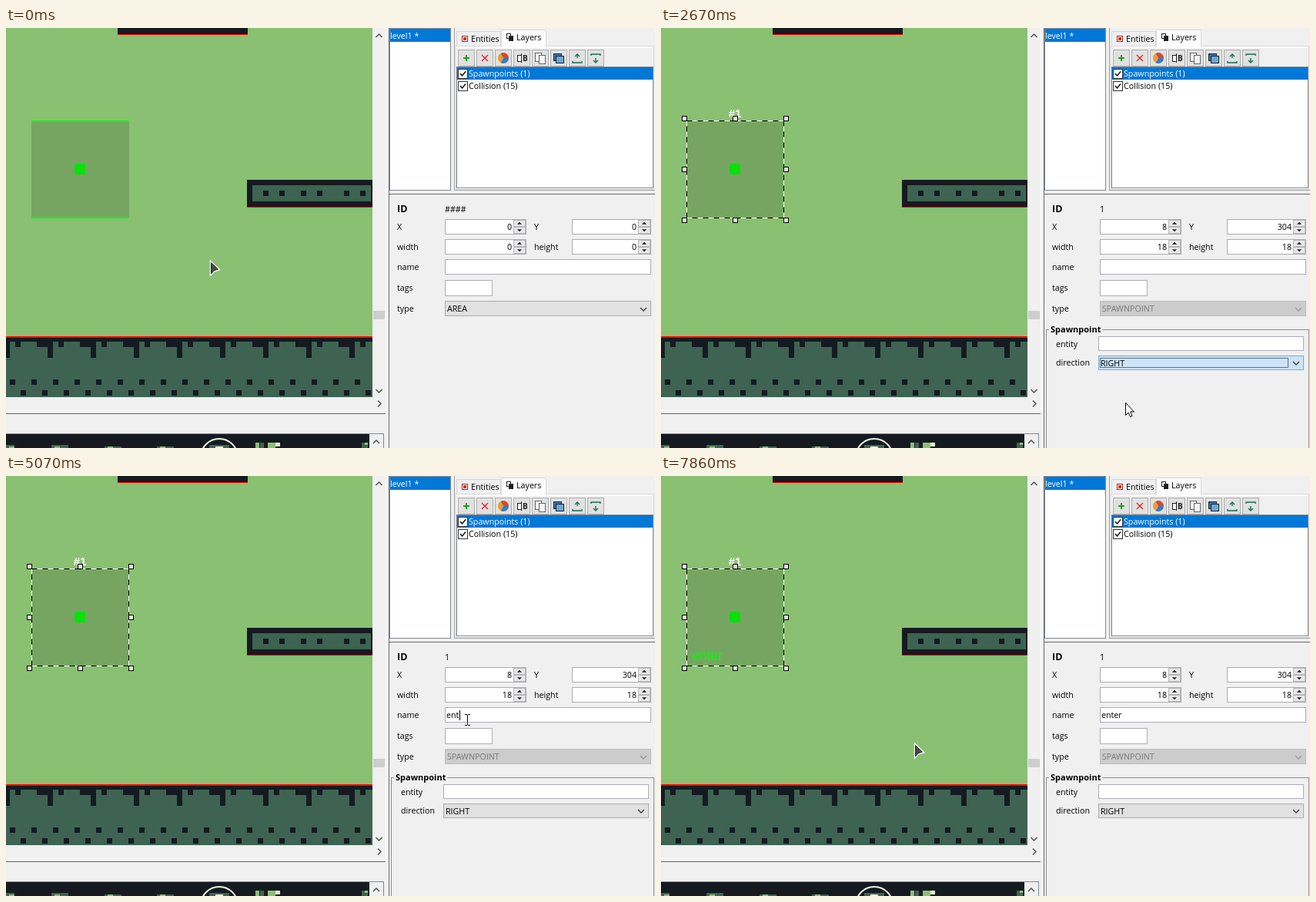
An HTML page with a canvas for the animation above (8 s loop, 843 px wide and 545 px high).

```html
<!DOCTYPE html>
<html>
<head>
<meta charset="utf-8">
<style>
html, body { margin: 0; width: 100%; height: 100%; overflow: hidden; background: #f0f0f0; }
canvas { display: block; }
</style>
</head>
<body>
<canvas id="stage" width="843" height="545"></canvas>
<script>
const ctx = document.getElementById('stage').getContext('2d');
const LOOP = 8000;
const UI = '10.7px "Open Sans", sans-serif';
const BOLD = 'bold 11px "Open Sans", sans-serif';
const BLUE = '#0078d7', INK = '#151a20', TEAL = '#3e6352', GRASS = '#8ac072';

// Event times in ms
const SELECT = 550, OPEN = 1640, CLOSE = 2650, FOCUS = 3900, NAMED = 7560;
const CLICKS = [500, 1590, 2560, 3900];
const KEYS = [4600, 4900, 5070, 5140, 5220];
const DIRECTIONS = ['DOWN', 'LEFT', 'RIGHT', 'UNDEFINED', 'UP'];
// Pointer path: time, x, y
const PATH = [
  [0, 266, 303], [130, 266, 303], [480, 122, 204], [850, 122, 204], [1150, 522, 357],
  [1460, 610, 435], [1720, 610, 435], [2040, 609, 471], [2190, 603, 486], [2780, 603, 486],
  [3610, 595, 322], [3670, 595, 322], [3760, 599, 316], [6230, 599, 316], [6840, 330, 348],
  [LOOP, 330, 348]
];

function rect(color, x, y, w, h) {
  ctx.fillStyle = color;
  ctx.fillRect(x, y, w, h);
}
function box(x, y, w, h, fill = '#fff', edge = '#abadb3') {
  rect(edge, x, y, w, h);
  rect(fill, x + 1, y + 1, w - 2, h - 2);
}
function text(str, x, y, color = '#000', font = UI, align = 'left') {
  ctx.font = font;
  ctx.textAlign = align;
  ctx.fillStyle = color;
  ctx.fillText(str, x, y);
}
function line(points, color, width = 1, fill) {
  ctx.beginPath();
  points.forEach(([x, y]) => ctx.lineTo(x, y));
  if (fill) {
    ctx.closePath();
    ctx.fillStyle = fill;
    ctx.fill();
  }
  ctx.lineWidth = width;
  ctx.strokeStyle = color;
  ctx.stroke();
}
function chevron(x, y, dx, dy, color = '#505050') {
  line([[x - dx - 4 * !!dy, y - dy - 4 * !!dx], [x + dx, y + dy], [x - dx + 4 * !!dy, y - dy + 4 * !!dx]], color, 1.5);
}
function disc(x, y, r, color, from = 0, to = 2 * Math.PI) {
  ctx.beginPath();
  ctx.moveTo(x, y);
  ctx.arc(x, y, r, from, to);
  ctx.fillStyle = color;
  ctx.fill();
}

function pointerAt(t) {
  const i = Math.max(1, PATH.findIndex(p => p[0] > t));
  const [t0, x0, y0] = PATH[i - 1], [t1, x1, y1] = PATH[i];
  const k = (t - t0) / (t1 - t0), e = k * k * (3 - 2 * k);
  return { x: Math.round(x0 + (x1 - x0) * e), y: Math.round(y0 + (y1 - y0) * e) };
}
const inside = (p, x, y, w, h) => p.x >= x && p.x < x + w && p.y >= y && p.y < y + h;

function drawLevel() {
  rect(GRASS, 0, 0, 476, 479);
  rect(INK, 145, 0, 169, 8);
  rect('#f00', 145, 8, 169, 1);

  rect(INK, 313, 197, 163, 35);
  rect('#f00', 313, 232, 163, 1);
  rect(TEAL, 320, 204, 154, 21);
  for (const x of [334, 355, 383, 404, 439, 460]) rect(INK, x, 211, 7, 7);

  rect(TEAL, 0, 400, 476, 79);
  rect(INK, 0, 400, 476, 7);
  rect('#f00', 0, 400, 476, 2);
  for (let x = -2; x < 476; x += 56) {
    rect(INK, x, 407, 7, 21);
    rect(INK, x + 14, 407, 7, 7);
    rect(INK, x + 42, 407, 14, 7);
  }
  for (let x = 5; x < 476; x += 28) {
    rect(INK, x, 456, 7, 7);
    rect(INK, x + 14, 470, 7, 7);
  }
}

function drawSpawn(t) {
  rect('#76a562', 33, 120, 127, 127);
  rect('#08e008', 89, 176, 14, 14);
  if (t < SELECT) {
    rect('#0f0', 33, 120, 127, 2);
    rect('#0f0', 33, 245, 127, 2);
    return;
  }
  if (t >= NAMED) text('enter', 40, 239, '#0f0', '17.5px "Liberation Sans", Arial, sans-serif');
  text('#1', 96, 116, '#fff', 'bold 15px "Liberation Sans", Arial, sans-serif', 'center');
  ctx.lineWidth = 1;
  ctx.strokeStyle = '#fff';
  ctx.strokeRect(33.5, 120.5, 126, 126);
  ctx.strokeStyle = '#000';
  ctx.setLineDash([7, 7]);
  ctx.lineDashOffset = 7 * Math.floor((t - 4100) / 242);
  ctx.strokeRect(33.5, 120.5, 126, 126);
  ctx.setLineDash([]);
  for (const x of [27, 93, 159])
    for (const y of [114, 180, 246])
      if (x !== 93 || y !== 180) box(x, y, 7, 7, '#e4eee0', '#000');
}

function drawFrame() {
  rect('#f0f0f0', 476, 0, 367, 545);
  rect('#f0f0f0', 0, 479, 498, 66);
  rect('#cdcdcd', 477, 367, 15, 11);
  chevron(484.5, 10, 0, -2);
  chevron(484.5, 471, 0, 2);
  chevron(485, 487.5, 2, 0);
  rect('#fff', 493, 0, 1, 496);
  rect('#fff', 0, 496, 494, 1);
  rect('#696969', 0, 500, 493, 1);
  rect('#696969', 497, 0, 1, 545);
  rect('#696969', 498, 215, 345, 1);

  // Tile sheet
  rect('#828790', 0, 526, 491, 19);
  rect(INK, 0, 527, 472, 18);
  rect('#f0f0f0', 472, 527, 18, 18);
  chevron(481, 537, 0, -2);
  for (const x of [0, 59, 128, 196]) {
    rect(TEAL, x, x > 99 ? 543 : 541, x ? 22 : 11, 4);
    rect(GRASS, x + 4, 543, 7, 2);
  }
  rect(GRASS, 324, 538, 5, 7);
  rect(TEAL, 330, 538, 5, 7);
  rect(GRASS, 340, 538, 10, 7);
  rect('#e4f5c8', 350, 538, 6, 5);
  rect(TEAL, 462, 538, 8, 7);
  rect(GRASS, 466, 538, 4, 3);
  ctx.strokeStyle = '#e8f2e0';
  ctx.lineWidth = 2;
  ctx.beginPath();
  ctx.arc(277, 557, 24, 0, 7);
  ctx.stroke();
  rect(TEAL, 264, 541, 26, 4);
  rect('#e8f2e0', 272, 543, 10, 2);
}

function drawIcons() {
  for (let i = 0; i < 8; i++) box(587 + 24 * i, 28, 22, 22, '#e1e1e1', '#adadad');
  rect('#20a020', 594, 38, 8, 2);
  rect('#20a020', 597, 35, 2, 8);
  line([[618, 35], [626, 43]], '#e02020', 1.3);
  line([[626, 35], [618, 43]], '#e02020', 1.3);
  ['#3d7ac0', '#e8a030', '#d84830'].forEach((c, i) => disc(646, 39, 7, c, i * 2.1, i * 2.1 + 2.1));
  box(664, 35, 6, 9, '#fff', '#222');
  text('B', 671, 43, '#222', 'bold 10px "Open Sans", sans-serif');
  rect('#222', 669, 33, 1, 12);
  box(687, 32, 9, 12, '#f4f4f4', '#666');
  box(692, 35, 9, 12, '#f4f4f4', '#666');
  box(711, 33, 11, 10, '#3478b8', '#222');
  box(714, 36, 11, 10, '#68a8dc', '#222');
  [[742, -1, '#167050'], [766, 1, '#167050']].forEach(([x, d, c]) => {
    const y = d < 0 ? 34 : 45;
    line([[x, 39], [x, y]], c, 1.4);
    line([[x - 3, y - d * 3], [x, y], [x + 3, y - d * 3]], c, 1.4);
    const base = d < 0 ? 45 : 34;
    line([[x - 6, base + 2 * d], [x - 6, base], [x + 6, base], [x + 6, base + 2 * d]], c, 1.4);
  });
}

function drawLists() {
  box(498, 0, 80, 211, '#fff', '#828790');
  rect(BLUE, 499, 1, 78, 17);
  text('level1 *', 499, 14, '#fff');

  rect('#a0a0a0', 582, 0, 1, 211);
  box(584, 23, 258, 187, '#fff', '#d9d9d9');
  rect('#a0a0a0', 583, 210, 260, 1);
  box(585, 4, 58, 20, '#f0f0f0', '#d9d9d9');
  box(643, 2, 59, 23, '#fff', '#d9d9d9');
  rect('#fff', 644, 23, 57, 2);
  box(592, 10, 8, 8, '#fff', '#b02018');
  rect('#d83020', 594, 12, 4, 4);
  text('Entities', 604, 18);
  box(650, 7, 6, 7, '#fff', '#222');
  box(653, 10, 6, 7, '#222', '#222');
  text('Layers', 663, 16);

  rect('#f0f0f0', 586, 26, 255, 25);
  drawIcons();
  box(585, 50, 256, 158, '#fff', '#828790');
  rect(BLUE, 586, 51, 254, 16);
  for (const y of [53, 69]) {
    box(587, y, 13, 13, '#fff', '#333');
    line([[590, y + 6], [592.5, y + 9], [597, y + 3.5]], '#000', 1.3);
  }
  text('Spawnpoints (1)', 601, 63, '#fff');
  text('Collision (15)', 601, 79);
}

function spinner(x, y, w, value) {
  box(x, y, w, 20);
  text(value, x + w - 19, y + 14, '#000', UI, 'right');
  const bx = x + w - 17;
  for (const [by, d] of [[y + 1, -1], [y + 10, 1]]) {
    box(bx, by, 16, 9, '#e8e8e8', '#b8b8b8');
    const cx = bx + 8, cy = by + 4.5;
    line([[cx - 2.5, cy - d], [cx + 2.5, cy - d], [cx, cy + 1.5 * d]], '#222', 0.6, '#222');
  }
}

function combo(x, y, w, h, value, state) {
  const [fill, edge, ink] = {
    normal: ['#e1e1e1', '#adadad', '#000'],
    hot: ['#cce4f7', '#7aaed6', '#000'],
    disabled: ['#cccccc', '#bfbfbf', '#787878']
  }[state];
  box(x, y, w, h, fill, edge);
  text(value, x + 3, y + 14, ink);
  chevron(x + w - 10, y + h - 9, 0, 2, state === 'disabled' ? '#999' : '#444');
}

function drawForm(t, pointer) {
  const selected = t >= SELECT;
  text('ID', 508, 239, '#000', 'bold 12.5px "Open Sans", sans-serif');
  text(selected ? '1' : '####', 570, 239);
  text('X', 508, 262);
  text('Y', 686, 262);
  text('width', 508, 288);
  text('height', 686, 288);
  text('name', 508, 314);
  text('tags', 508, 341);
  text('type', 508, 368);
  const [x, y, size] = selected ? [8, 304, 18] : [0, 0, 0];
  spinner(570, 248, 106, x);
  spinner(735, 248, 103, y);
  spinner(570, 274, 106, size);
  spinner(735, 274, 103, size);
  box(570, 300, 268, 20);
  box(570, 327, 62, 21);
  combo(570, 354, 268, 20, selected ? 'SPAWNPOINT' : 'AREA', selected ? 'disabled' : 'normal');

  const name = 'enter'.slice(0, KEYS.filter(k => k <= t).length);
  text(name, 572, 314);
  const since = t - Math.max(FOCUS, ...KEYS.filter(k => k <= t));
  if (t >= FOCUS && Math.floor(since / 502) % 2 === 0) {
    ctx.font = UI;
    rect('#000', Math.round(572.5 + ctx.measureText(name).width * 0.98), 304, 1, 13);
  }
  if (selected) drawSpawnGroup(t, pointer);
}

function drawSpawnGroup(t, pointer) {
  ctx.lineWidth = 1;
  ctx.strokeStyle = '#8c8c8c';
  ctx.strokeRect(500.5, 391.5, 341, 170);
  rect('#f0f0f0', 504, 386, 69, 10);
  text('Spawnpoint', 506, 395, '#000', BOLD);
  text('entity', 513, 414);
  text('direction', 513, 438);
  box(568, 400, 267, 19);
  const open = t >= OPEN && t < CLOSE;
  const hot = open || (t >= CLOSE && t < 2820) || inside(pointer, 568, 425, 267, 19);
  combo(568, 425, 267, 19, t < CLOSE ? 'DOWN' : 'RIGHT', hot ? 'hot' : 'normal');
  if (t >= CLOSE && t < FOCUS) {
    ctx.strokeStyle = '#000';
    ctx.lineWidth = 1;
    ctx.setLineDash([1, 1]);
    ctx.lineDashOffset = 0;
    ctx.strokeRect(570.5, 428.5, 244, 12);
    ctx.setLineDash([]);
  }
  if (!open) return;
  box(568, 444, 267, 82, '#fff', '#000');
  const hover = Math.max(0, Math.floor((pointer.y - 445) / 16));
  DIRECTIONS.forEach((d, i) => {
    if (i === hover) rect(BLUE, 569, 445 + 16 * i, 265, 16);
    text(d, 569, 457 + 16 * i, i === hover ? '#fff' : '#000');
  });
}

function drawPointer(p, t) {
  if (CLICKS.some(c => t >= c && t < c + 80)) disc(p.x, p.y, 12, 'rgba(246,234,20,.72)');
  ctx.save();
  ctx.translate(p.x, p.y);
  const overText = inside(p, 570, 300, 268, 20) || inside(p, 570, 327, 62, 21) ||
    (t >= SELECT && inside(p, 568, 400, 267, 19));
  if (overText) {
    ctx.globalCompositeOperation = 'difference';
    rect('#fff', 0, -6, 1, 13);
    for (const y of [-7, 7]) {
      rect('#fff', -3, y, 3, 1);
      rect('#fff', 1, y, 3, 1);
    }
  } else if (p.x < 476) {
    line([[0, 0], [0, 17], [4.5, 12.5], [11, 10.5]], '#fff', 2.2, '#fff');
    line([[0.5, 1.5], [0.5, 16], [4, 11.8], [9.5, 10]], '#222', 1, '#484848');
  } else {
    line([[0.5, 0.5], [0.5, 16.5], [4, 13], [6.5, 18.5], [9, 17.5], [6.7, 12], [11.5, 12], [0.5, 0.5]], '#000', 1, '#fff');
  }
  ctx.restore();
}

function draw(now) {
  const t = now % LOOP;
  const pointer = pointerAt(t);
  drawLevel();
  drawSpawn(t);
  drawFrame();
  drawLists();
  drawForm(t, pointer);
  drawPointer(pointer, t);
  requestAnimationFrame(() => draw(performance.now() - start));
}
const start = performance.now();
draw(0);
</script>
</body>
</html>
```
